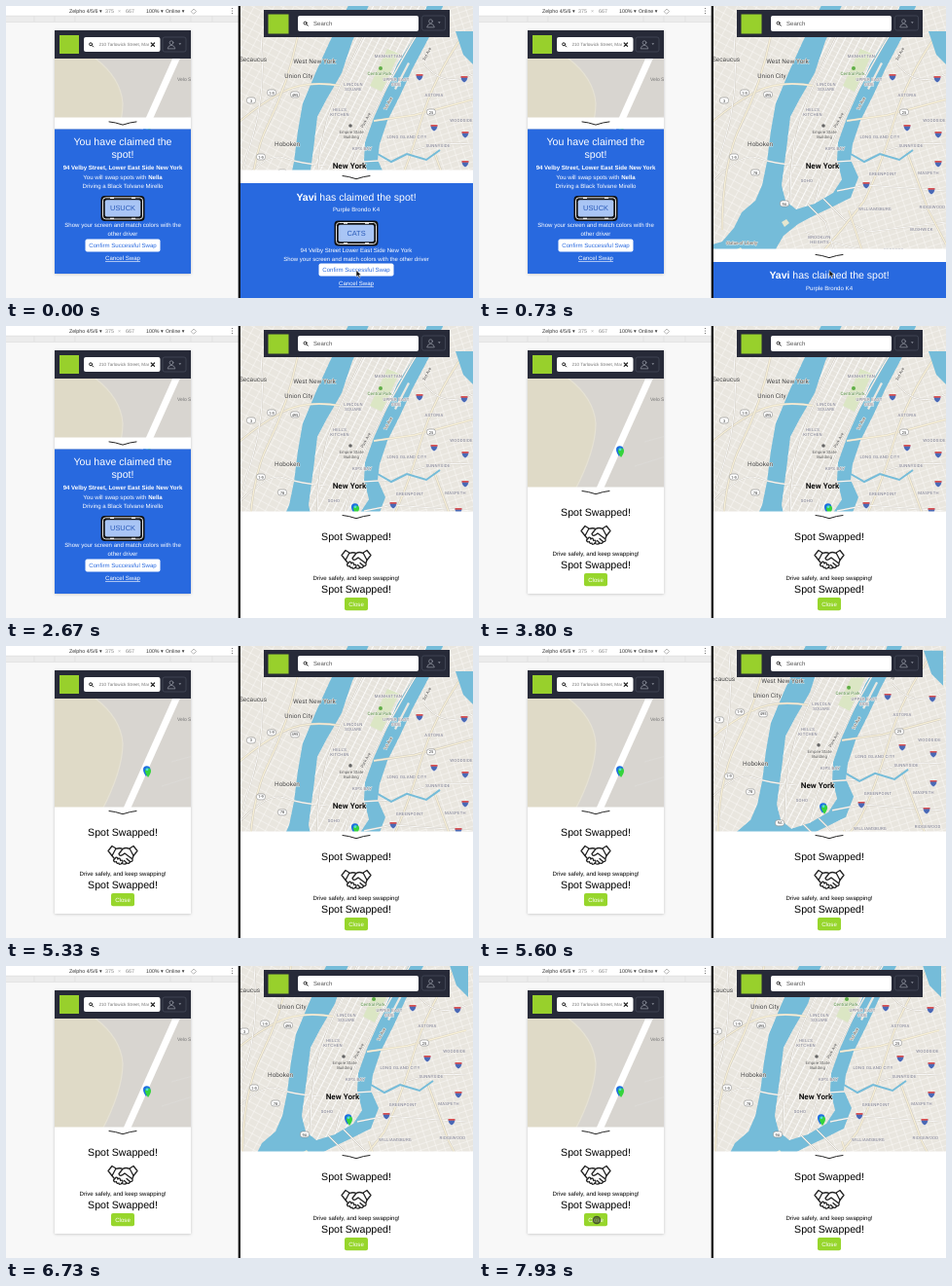
Recreate the animation shown at these times as an HTML page. Size 480 by 300 pixels, loop 8000 ms.

```html
<!DOCTYPE html>
<html lang="en">
<head>
<meta charset="utf-8">
<title>Spot swap</title>
<style>
  html, body { margin: 0; height: 100%; overflow: hidden; background: #f8f8f8; }
  svg { display: block; }
  #stage { width: 100vw; height: 100vh; }
  text { font: 6.1px "Liberation Sans", Arial, sans-serif; text-rendering: geometricPrecision; }
  .mid text, text.mid { text-anchor: middle; }
  .on-blue text { fill: #fff; }
  text.big { font-size: 10.6px; }
  text.action { fill: #2869df; }
  text.bold, .bold { font-weight: bold; }
  .tools text { font-size: 5.3px; fill: #333; }
  #labels text { font-family: Roboto, sans-serif; text-anchor: middle; stroke: #f4f1eb; stroke-width: 1; paint-order: stroke; }
  #labels .town { font-size: 6.5px; fill: #444; }
  #labels .area { font-size: 4.3px; fill: #74768c; letter-spacing: .25px; }
  #labels .city { font-size: 8.1px; font-weight: bold; fill: #111; }
  #labels .street { font-size: 4.4px; fill: #555; }
  #labels .park { font-size: 4.6px; fill: #4c8a3c; }
  #labels .badge { font-size: 4px; fill: #333; stroke: none; }
  .line { fill: none; stroke: #222; stroke-linecap: round; stroke-linejoin: round; }
</style>
</head>
<body>
<svg id="stage" viewBox="0 0 480 300" preserveAspectRatio="none">
  <defs>
    <pattern id="gridWest" width="9" height="7" patternUnits="userSpaceOnUse" patternTransform="rotate(28)">
      <path d="M0 0H9M0 0V7" stroke="#fbfaf8" stroke-width="1" fill="none"/>
    </pattern>
    <pattern id="gridCity" width="7" height="5" patternUnits="userSpaceOnUse" patternTransform="rotate(27)">
      <path d="M0 0H7" stroke="#f8f7f4" stroke-width=".9"/>
      <path d="M0 0V5" stroke="#fff" stroke-width="1.7"/>
    </pattern>
    <pattern id="gridEast" width="8" height="6" patternUnits="userSpaceOnUse" patternTransform="rotate(-18)">
      <path d="M0 0H8M0 0V6" stroke="#fbfaf8" stroke-width="1" fill="none"/>
    </pattern>
    <clipPath id="rightSide"><path d="M241 0h239v300H241z"/></clipPath>
    <clipPath id="phoneClip"><path d="M50 25h140v250H50z"/></clipPath>
    <clipPath id="fieldClip"><path d="M94 32h53v15H94z"/></clipPath>
    <filter id="shadow" x="-10%" y="-10%" width="120%" height="120%">
      <feDropShadow dx="0" dy=".5" stdDeviation="1.5" flood-opacity=".22"/>
    </filter>

    <path id="chevron" class="line" stroke-width="1" d="M-14 -1.5Q-8 -1 0 1.7Q8 -1 14 -1.5"/>
    <g id="pin">
      <path d="M-1 5C-3 2-4 0-4-2A3.7 3.7 0 0 1 3.4-2C3.4 0 1 2-1 5z" fill="#1d6fe0"/>
      <path d="M1 6C-1 3-2 1-2-.6A2.8 2.8 0 0 1 4-.6C4 1 3 3 1 6z" fill="#35d43c"/>
      <circle cx="0" cy="-2.2" r="1.4" fill="#4fd8dc"/>
    </g>
    <g id="plate">
      <rect x="-22.5" y="-13" width="45" height="26" rx="4" fill="#111"/>
      <rect x="-20.5" y="-11" width="41" height="22" rx="3" fill="none" stroke="#fff" stroke-width=".9"/>
      <rect x="-18.3" y="-8.7" width="36.6" height="17.4" rx="2" fill="#a9c5f5"/>
      <path d="M-13-10.5h4M9-10.5h4M-13 10.5h4M9 10.5h4" stroke="#fff" stroke-width="1.4"/>
    </g>
    <g id="confirm">
      <rect x="-38.5" y="-6.5" width="77" height="13" rx="2" fill="#fff"/>
      <text class="mid action" y="2.3">Confirm Successful Swap</text>
    </g>
    <g id="user">
      <rect x="-12" y="-7.5" width="24" height="15" rx="2" fill="none" stroke="#454a58" stroke-width=".8"/>
      <g class="line" style="stroke:#8b8f9a" stroke-width=".8">
        <circle cx="-3" cy="-1.8" r="1.9"/>
        <path d="M-6.8 4Q-6.3 1-3 .8Q.3 1 .8 4z"/>
      </g>
      <path d="M4.5-1.2h2.6L5.8.4z" fill="#8b8f9a"/>
    </g>
    <g id="lens" class="line" stroke-width="1"><circle r="1.5" cx="-.4" cy="-.4"/><path d="M.8 .8l1.4 1.4"/></g>

    <g id="swapped">
      <path d="M241 190.500h240v111H241z" fill="#fff"/>
      <use href="#chevron" x="360" y="196"/>
      <g class="mid">
        <text class="big" x="360" y="219.5">Spot Swapped!</text>
        <text x="360" y="261">Drive safely, and keep swapping!</text>
        <text class="big" x="360" y="273.5">Spot Swapped!</text>
      </g>
      <g class="line" stroke-width="1.3" transform="translate(360 240)">
        <path d="M-15-4.500L-11-9.500L-7-7L-11 .5zM15-4.500L11-9.500L7-7L11 .5z"/>
        <path d="M-7-6.500Q-3-8 0-6.500L-4-1.500Q-3 2.500 2-2L10 4Q10.500 7 7.500 6.500Q7 9 4 8Q2.500 10-.5 8.500M0-6.500Q3-8.500 7-6.500M11 .5L9.800 4"/>
        <path d="M-11 .5L-9 3M4 3.500L7.500 6.500M1.500 5.500L4 8"/>
        <path d="M-9.500 5L-7 2.200Q-5 1.800-5.200 4Q-3 1.500-2.300 5.500Q.2 4.500 0 7L-2 9Q-4 10-4 8Q-6.500 9-6.500 6.500Q-9 7.500-9.500 5z"/>
      </g>
      <rect x="348" y="279" width="24" height="13.3" rx="2" fill="#97d62c"/>
      <text class="mid" x="360" y="287.8" fill="#fff">Close</text>
    </g>
  </defs>

  <g clip-path="url(#rightSide)">
    <g id="map">
      <path d="M230-20h260v380H230z" fill="#75bcd9"/>
      <g id="land"></g>
      <path d="M374 82L392 44L404 49L386 88z" fill="#dbe6c4"/>
      <g id="roads" fill="none"></g>
      <path d="M462 26H482V62L470 50z" fill="#75bcd9"/>
      <path d="M311 222l5-3l3 4l-5 4zM265 250l4-2l2 3l-4 2z" fill="#e4e6cf"/>
      <path d="M413 58l2 1l-14 27l-2-1z" fill="#ece9e2"/>
      <g id="labels"></g>
      <use id="rightPin" href="#pin" x="359" y="188"/>
    </g>
    <g opacity=".85">
      <circle cx="247" cy="278.5" r="3" fill="#dce6ea" stroke="#55798c" stroke-width=".8"/>
      <text x="252" y="281" fill="#eef4f6" stroke="#55798c" stroke-width=".9" paint-order="stroke" style="font-size:7.6px" class="bold">tilloo</text>
      <circle cx="471" cy="277" r="3" fill="#222"/>
      <path d="M471 276.500v2M471 275v.7" stroke="#fff" stroke-width=".8"/>
    </g>
    <g id="claim">
      <path d="M241 168.500h240v14H241z" fill="#fff"/>
      <path d="M241 182h240v130H241z" fill="#2869df"/>
      <use href="#chevron" x="360" y="176"/>
      <g class="mid on-blue">
        <text class="big" style="font-size:10.5px" x="360" y="199.5"><tspan class="bold">Yavi</tspan> has claimed the spot!</text>
        <text x="360" y="211.3">Purple Brondo K4</text>
        <text x="360" y="253">94 Velby Street Lower East Side New York</text>
        <text x="360" y="262" style="font-size:6px">Show your screen and match colors with the other driver</text>
        <text x="360" y="287" text-decoration="underline">Cancel Swap</text>
      </g>
      <use href="#plate" x="360" y="233.5"/>
      <text class="mid" x="360" y="236.2" fill="#2859b8" style="font-size:7.4px">CATS</text>
      <use href="#confirm" x="360" y="271"/>
    </g>
    <use id="rightDone" href="#swapped"/>
    <path d="M265 4h191v28H265z" fill="#272a38"/>
    <rect x="269.500" y="8.500" width="21" height="20" fill="#98d02c"/>
    <rect x="300" y="10" width="124" height="16" rx="2" fill="#fff"/>
    <use href="#lens" x="308" y="18"/>
    <text x="316" y="20.3" fill="#555">Search</text>
    <use href="#user" x="439.5" y="17.5"/>
    <path id="arrow" d="M360 271.5v6.8l1.7-1.5l1.2 2.6l1.2-.6l-1.2-2.5h2.2z" fill="#111" stroke="#fff" stroke-width=".5"/>
  </g>

  <path d="M0 0h239v300H0z" fill="#f8f8f8"/>
  <path d="M0 0h239v10H0z" fill="#fff"/>
  <path d="M0 10h239v6.5H0z" fill="#ececec"/>
  <path d="M0 10.2h239M0 16.5h239M29 10v6M50 10v6M71 10v6M169 10v6M190 10v6M212 10v6" stroke="#dcdcdc" stroke-width=".6"/>
  <g class="tools">
    <text x="65" y="7.3">Zelpho 4/5/6 ▾</text>
    <text x="102" y="7.3" style="fill:#888">375</text>
    <text x="115" y="7.3" style="fill:#aaa">×</text>
    <text x="123" y="7.3" style="fill:#888">667</text>
    <text x="144" y="7.3">100% ▾</text>
    <text x="164" y="7.3">Online ▾</text>
    <path class="line" style="stroke:#999" stroke-width=".7" d="M190.500 5.500l2.500-2.500l2.500 2.500l-2.500 2.500z"/>
    <path class="line" style="stroke:#555" stroke-width="1.1" d="M232.500 2.500v0M232.500 5v0M232.500 7.500v0"/>
  </g>
  <path d="M50 25h140v250H50z" fill="#fff" filter="url(#shadow)"/>
  <g clip-path="url(#phoneClip)">
    <path d="M50 54h140v221H50z" fill="#d8d5d0"/>
    <path d="M50 54H92Q118 74 120 100Q120 128 98 170H50z" fill="#dfdac7"/>
    <path d="M92 54Q118 74 120 100Q120 128 98 170" fill="none" stroke="#e6e2d4" stroke-width="1.2"/>
    <path d="M179 45L122 172" stroke="#fff" stroke-width="7"/>
    <path d="M170 119L192 113M160 144L192 134" stroke="#dcdad6" stroke-width="1"/>
    <text x="176" y="77" fill="#777" style="font-size:5px">Velo St</text>
    <use href="#pin" x="145" y="129"/>
    <g id="phoneClaim" transform="translate(0 -.6)">
      <path d="M50 115h140v12H50z" fill="#fff"/>
      <path d="M50 127h140v150H50z" fill="#2869df"/>
      <use href="#chevron" x="120" y="121"/>
      <g class="mid on-blue">
        <text class="big" x="120" y="144">You have claimed the</text>
        <text class="big" x="120" y="157">spot!</text>
        <text class="bold" x="120" y="169">94 Velby Street, Lower East Side New York</text>
        <text x="120" y="178.600">You will swap spots with <tspan class="bold">Nella</tspan></text>
        <text x="120" y="187.300">Driving a Black Tolvane Mirello</text>
        <text x="120" y="228">Show your screen and match colors with the</text>
        <text x="120" y="237">other driver</text>
        <text x="120" y="262" text-decoration="underline">Cancel Swap</text>
      </g>
      <use href="#plate" x="120" y="208.500"/>
      <text class="mid" x="120" y="211" fill="#2859b8" style="font-size:7.4px">USUCK</text>
      <use href="#confirm" x="120" y="246.500"/>
    </g>
    <use id="phoneDone" href="#swapped"/>
    <path d="M50 25h140v29H50z" fill="#272a38"/>
    <rect x="55" y="30" width="20" height="19" fill="#98d02c"/>
    <rect x="80" y="32" width="78.500" height="15" rx="2" fill="#fff"/>
    <use href="#lens" x="87.500" y="39.700"/>
    <text x="95.500" y="41.300" fill="#777" style="font-size:4.6px" clip-path="url(#fieldClip)">210 Tarlowick Street, Manhattan</text>
    <path class="line" stroke-width="1.200" d="M149.200 38l3.400 3.400M152.600 38l-3.400 3.400"/>
    <use href="#user" x="173" y="39.500"/>
    <circle id="touch" r="3.800" fill="#222" fill-opacity=".5" stroke="#333" stroke-width=".8"/>
  </g>
  <path d="M238.700 0h2.300v300h-2.300z" fill="#111"/>
</svg>

<script>
const $ = id => document.getElementById(id);

// Map
const regions = [
  ['gridWest', '#e9e6df', 'M230-20H362L333 36L318 69L305 100L300 128L296 160L291 184L284 200L270 212L262 228L250 242L230 248z'],
  ['gridCity', '#e6e3dc', 'M382-20L356 36L345 69L330 95L320 114L316 147L311 184L315 200L326 209L345 203L364 192L373 178L368 158L369 140L378 115L390 88L402 60L422 28L440-20z'],
  ['gridEast', '#e9e6df', 'M490-20H458L436 30L418 64L406 90L392 118L384 142L382 158L390 176L382 197L362 207L345 215L328 224L313 236L306 248L302 258L312 268L298 292L290 360H490z']
];
$('land').innerHTML = regions.map(([grid, color, d]) =>
  `<path d="${d}" fill="${color}"/><path d="${d}" fill="url(#${grid})"/>`).join('');

const road = (d, color, width) => `<path d="${d}" stroke="${color}" stroke-width="${width}"/>`;
$('roads').innerHTML = [
  'M241 118Q262 100 285 88T345 82', 'M241 180Q270 150 286 156T330 164', 'M262 30Q268 90 252 140T241 200',
  'M300 30Q290 80 270 120T250 230', 'M320 203Q318 140 340 90T378 10', 'M346 200Q355 150 384 97T422 30',
  'M378 118L420 112L480 96', 'M366 160L400 158Q430 138 480 142', 'M354 198L376 220L400 232L480 222',
  'M470 30Q440 72 426 120T396 200Q370 235 320 290', 'M368 190L398 184L480 190', 'M335 232Q400 260 480 258',
  'M380 210L410 300', 'M430 60Q450 85 480 70', 'M338 204L356 222L380 300', 'M440 150L462 210L480 245'
].map((d, i) => road(d, '#cfcac0', i % 3 ? 1.6 : 2.2) + road(d, i % 3 ? '#fff' : '#f7efd6', i % 3 ? .9 : 1.3)).join('') +
  road('M382 152L396 160L412 152L432 158L446 148', '#75bcd9', 2);

const groups = {
  town: ['Secaucus 254 57', 'West_New_York 317 59', 'Union_City 301 74', 'Hoboken 289 144'],
  city: ['New_York 353 167'],
  area: ['MANHATTAN 393 53', 'LINCOLN 357 82', 'SQUARE 357 87', "HELL'S 343 108", 'KITCHEN 343 113', 'UPPER_EAST 401 77', 'SIDE 401 82',
    'KIPS_BAY 366 148', 'LONG_ISLAND_CITY 412 136', 'ASTORIA 440 93', 'SUNNYSIDE 444 145', 'WOODSIDE 468 119', 'GREENPOINT 415 174',
    'MASPETH 462 173', 'SOHO 337 181', 'WILLIAMSBURG 407 210', 'BUSHWICK 455 231', 'RIDGEWOOD 466 208', 'BROOKLYN 350 239', 'HEIGHTS 350 244',
    'BEDFORD- 427 252', 'STUYVESANT 427 258', 'PROSPECT 386 270', 'HEIGHTS 386 275', 'CROWN_HEIGHTS 425 281', 'RED_HOOK 323 273'],
  park: ['Central_Park 384 71'],
  street: ['Empire_State 355 131', 'Building 355 136', 'Statue_of_Liberty 270 245']
};
const entry = s => { const [name, x, y] = s.split(' '); return { name: name.replaceAll('_', ' '), x: +x, y: +y }; };
let labels = '';
for (const [kind, list] of Object.entries(groups))
  for (const { name, x, y } of list.map(entry)) labels += `<text class="${kind}" x="${x}" y="${y}">${name}</text>`;
for (const { name, x, y } of ['495 297 91', '1-9 273 89', '1-9 262 155', '78 284 171', '9A 314 203', '25 437 109', '3 252 97'].map(entry))
  labels += `<rect x="${x - 4.5}" y="${y - 3}" width="9" height="6" rx="2.5" fill="#fff" stroke="#888" stroke-width=".6"/><text class="badge" x="${x}" y="${y + 1.5}">${name}</text>`;
for (const [x, y] of [[425, 73], [471, 75], [440, 125], [472, 132], [398, 184], [465, 190], [472, 162]])
  labels += `<g transform="translate(${x} ${y}) scale(.85)"><path d="M-4-3.5H4Q5 2 0 4.500Q-5 2-4-3.500z" fill="#4968b5" stroke="#fff" stroke-width=".5"/><path d="M-4-3.500H4L4.200-1.500H-4.200z" fill="#d95252"/></g>`;
for (const [name, x, y] of [['3rd Ave', 434, 50], ['1st Ave', 394, 101], ['Park Ave', 371, 118]])
  labels += `<text class="street" transform="translate(${x} ${y}) rotate(-62)">${name}</text>`;
labels += '<circle cx="385" cy="64" r="2" fill="#5fae47"/><circle cx="354" cy="123" r="1.8" fill="#666"/>';
$('labels').innerHTML = labels;

// Motion
const progress = (t, from, to) => Math.min(1, Math.max(0, (t - from) / (to - from)));
const easeOut = (p, power = 2) => 1 - (1 - p) ** power;
const move = (id, x, y) => $(id).setAttribute('transform', `translate(${x} ${y})`);
const show = (id, on) => $(id).setAttribute('visibility', on ? 'visible' : 'hidden');

function render(now) {
  const t = now % 8000;
  const slide = progress(t, 400, 930);
  move('claim', 0, 118.5 * slide * slide * (3 - 2 * slide));
  show('claim', t < 2670);
  show('rightDone', t >= 2670);
  show('rightPin', t >= 1070);
  show('arrow', t < 1070);

  const drag = easeOut(progress(t, 5330, 5870), 1.75);
  move('map', -7 * drag, -30 * drag);

  show('phoneClaim', t < 2930);
  show('phoneDone', t >= 2930);
  move('phoneDone', -240, -75 + 50 * easeOut(progress(t, 2930, 3200)));

  const reach = easeOut(progress(t, 7470, 7870));
  show('touch', t >= 7470);
  move('touch', 165 - 44 * reach, 190 + 71 * reach);
  requestAnimationFrame(render);
}
requestAnimationFrame(render);
</script>
</body>
</html>
```
